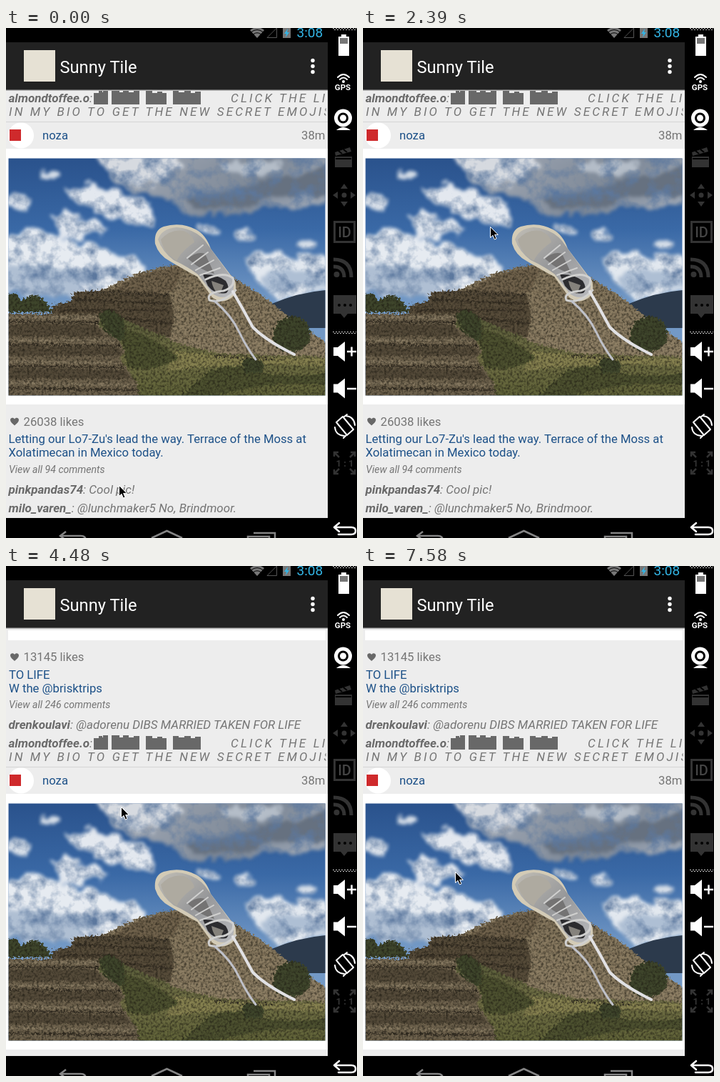
Recreate the animation shown at these times as an HTML page. Size 492 by 714 pixels, loop 8 s.

```html
<!DOCTYPE html>
<html lang="en">
<head>
<meta charset="utf-8">
<title>Photo feed</title>
<style>
html, body { margin: 0; width: 100%; height: 100%; overflow: hidden; background: #000; }
svg { display: block; }
text { font: 16.7px Roboto, sans-serif; fill: #757575; white-space: pre; }
.link { fill: #1d5188; }
.note { font-size: 14.1px; font-style: italic; fill: #757575; }
.say { font-size: 17px; font-style: italic; fill: #757575; }
.say tspan { font-weight: 700; fill: #6a6a6a; }
.wide { letter-spacing: 3.15px; }
.title { font-size: 23.7px; fill: #fff; }
.clock { font-size: 19px; fill: #33b5e5; }
.line { fill: none; stroke-linecap: round; stroke-linejoin: round; }
.on { fill: #fff; }
.off { fill: #333; }

#feed { animation: scroll 8s step-end infinite; }
#cursor { animation: point 8s step-end infinite; }

@keyframes scroll {
  0% { transform: translateY(-150px); }
  33.625%, 100% { transform: translateY(0); }
}
@keyframes point {
  0% { transform: translate(158px, 640px); }
  1.875% { transform: translate(157px, 641px); }
  5.5% { transform: translate(158px, 627px); }
  7.375% { transform: translate(158px, 613px); }
  14.875% { transform: translate(160px, 560px); }
  16.75% { transform: translate(168px, 430px); }
  18.625% { transform: translate(177px, 310px); }
  20.5% { transform: translate(178px, 273px); }
  28% { transform: translate(178px, 275px); }
  29.875% { transform: translate(178px, 278px); }
  33.625% { transform: translate(167px, 336px); }
  35.5% { transform: translate(167px, 338px); }
  37.375% { transform: translate(166px, 339px); }
  39.25% { transform: translate(165px, 339px); }
  44.875% { transform: translate(165px, 338px); }
  50.375% { transform: translate(164px, 337px); }
  54.125% { transform: translate(163px, 337px); }
  56% { transform: translate(161px, 337px); }
  57.875% { transform: translate(150px, 330px); }
  59.75% { transform: translate(130px, 318px); }
  61.5% { transform: translate(108px, 304px); }
  63.375% { transform: translate(94px, 292px); }
  65.25% { transform: translate(99px, 281px); }
  67% { transform: translate(109px, 272px); }
  74.375% { transform: translate(90px, 258px); }
  76.25% { transform: translate(60px, 238px); }
  78.125% { transform: translate(28px, 222px); }
  80% { transform: translate(10px, 214px); }
  81.75% { transform: translate(34px, 228px); }
  83.625% { transform: translate(50px, 255px); }
  85.5% { transform: translate(72px, 300px); }
  87.375% { transform: translate(95px, 350px); }
  89.25% { transform: translate(112px, 390px); }
  91.125% { transform: translate(124px, 414px); }
  92.875% { transform: translate(128px, 425px); }
  94.75%, 100% { transform: translate(129px, 428px); }
}
</style>
</head>
<body>
<svg width="492" height="714" viewBox="0 0 492 714">
<defs>
  <clipPath id="view"><rect y="87" width="451" height="599"/></clipPath>
  <clipPath id="column"><rect x="3" width="445.5" height="900"/></clipPath>
  <linearGradient id="sky" x2="0" y2="1">
    <stop offset="0" stop-color="#2a528c"/>
    <stop offset=".3" stop-color="#3a69a6"/>
    <stop offset=".6" stop-color="#7399c6"/>
  </linearGradient>
  <linearGradient id="storm" x2="1" y2=".25">
    <stop offset="0" stop-color="#bcc4cf"/>
    <stop offset=".35" stop-color="#949daa"/>
    <stop offset=".75" stop-color="#7b8695"/>
    <stop offset="1" stop-color="#98a2b0"/>
  </linearGradient>
  <linearGradient id="stone" x2="0" y2="1">
    <stop offset="0" stop-color="#82745b"/>
    <stop offset="1" stop-color="#94856a"/>
  </linearGradient>
  <linearGradient id="grass" x2="0" y2="1">
    <stop offset="0" stop-color="#565a38"/>
    <stop offset=".5" stop-color="#706f45"/>
    <stop offset="1" stop-color="#5d6036"/>
  </linearGradient>
  <linearGradient id="canvas" x2="1" y2="1">
    <stop offset="0" stop-color="#c0bdb5"/>
    <stop offset=".5" stop-color="#97989a"/>
    <stop offset="1" stop-color="#b9babd"/>
  </linearGradient>
  <filter id="ragged" x="-10%" y="-10%" width="120%" height="120%" color-interpolation-filters="sRGB">
    <feTurbulence type="fractalNoise" baseFrequency=".045" numOctaves="4" seed="4" result="noise"/>
    <feDisplacementMap in="SourceGraphic" in2="noise" scale="24" xChannelSelector="R" yChannelSelector="G"/>
    <feGaussianBlur stdDeviation="2.5" result="cloud"/>
    <feColorMatrix in="noise" values="0 0 0 0 .36  0 0 0 0 .47  0 0 0 0 .62  0 0 2.2 0 -.9"/>
    <feComposite in2="cloud" operator="in" result="shade"/>
    <feMerge><feMergeNode in="cloud"/><feMergeNode in="shade"/></feMerge>
  </filter>
  <filter id="grain" x="0" y="0" width="100%" height="100%" color-interpolation-filters="sRGB">
    <feTurbulence type="fractalNoise" baseFrequency=".3" numOctaves="3" seed="9" result="noise"/>
    <feDisplacementMap in="SourceGraphic" in2="noise" scale="9" xChannelSelector="R" yChannelSelector="G" result="rough"/>
    <feColorMatrix in="noise" values="0 0 0 0 .1  0 0 0 0 .09  0 0 0 0 .06  1.5 0 0 0 -.6"/>
    <feComposite in2="rough" operator="in" result="specks"/>
    <feMerge><feMergeNode in="rough"/><feMergeNode in="specks"/></feMerge>
  </filter>
  <path id="heart" d="M12 133C9 130.500 6 128 6 125.300C6 121.700 10.500 121.200 12 124C13.500 121.200 18 121.700 18 125.300C18 128 15 130.500 12 133Z" fill="#686868"/>
</defs>

<rect width="492" height="714"/>

<!-- Feed -->
<g clip-path="url(#view)">
  <rect y="86" width="451" height="600" fill="#ededed"/>
  <g id="feed">
    <rect x="3" y="90" width="445" height="14" fill="#fff"/>
    <use href="#heart"/>
    <text x="24.500" y="133">13145 likes</text>
    <text class="link" x="4" y="158">TO LIFE</text>
    <text class="link" x="4" y="177">W the @brisktrips</text>
    <text class="note" x="4" y="199">View all 246 comments</text>
    <text class="say" x="3.500" y="228"><tspan>drenkoulavi</tspan>: @adorenu DIBS MARRIED TAKEN FOR LIFE</text>
    <text class="say" x="3.500" y="254"><tspan>almondtoffee.o</tspan>:</text>
    <path fill="#686868" d="M123 257v-16h7v-3h5v2h1v-3h7v20zM148 257v-20h11v3h5v-3h8v3h7v-2h8v19zM196 257v-19h9v3h7v-2h7v2h6v16zM234 257v-19h8v2h8v-2h9v3h6v-2h8v18z"/>
    <g clip-path="url(#column)">
      <text class="say wide" x="315" y="254">CLICK THE LI</text>
      <text class="say wide" x="4" y="273">IN MY BIO TO GET THE NEW SECRET EMOJIS</text>
    </g>
    <path d="M0 281.500H451" stroke="#d5d5d5"/>

    <circle cx="21" cy="300.500" r="18" fill="#fff"/>
    <rect x="5" y="292" width="16" height="16" fill="#cf2a2c"/>
    <text class="link" x="51" y="305.500">noza</text>
    <text x="447.500" y="305.500" text-anchor="end">38m</text>
    <rect y="319" width="451" height="358" fill="#fff"/>

    <svg x="3.500" y="332.500" width="444" height="332" viewBox="3.500 182.500 444 332">
      <rect x="3" y="182" width="446" height="334" fill="url(#sky)"/>
      <g filter="url(#ragged)">
        <path fill="url(#storm)" d="M128 175H460V250Q430 240 405 258Q370 242 345 256Q315 268 285 262Q255 262 238 246Q215 228 180 226Q140 214 144 200Z"/>
        <path fill="#d6dae0" d="M130 180H235Q260 190 232 202Q218 222 190 220Q155 214 142 200Z"/>
        <path fill="#667180" d="M250 240Q290 222 330 225Q380 212 455 195V232Q410 238 370 236Q320 258 280 256Z"/>
        <path fill="#b4bdc8" d="M300 186H380Q400 200 360 206Q330 212 310 202Z"/>
        <path fill="#e3e8ef" d="M82 228Q112 216 140 228Q180 226 200 245Q218 262 208 276Q178 284 160 268Q135 262 118 250Q95 245 82 228Z"/>
        <path fill="#e0e6ee" d="M60 262Q90 254 108 268Q135 268 142 282Q132 294 108 288Q95 300 72 292Q80 275 60 262Z"/>
        <path fill="#e6ebf1" d="M-5 300Q35 272 62 288Q90 300 112 300Q150 310 165 324Q190 318 200 340L160 376H-5Z"/>
        <path fill="#afbfd3" d="M0 335Q42 322 78 342Q100 330 124 350L105 376H0Z"/>
        <path fill="#e2e8ef" d="M335 325Q360 302 388 318Q425 312 460 330V372Q410 370 385 382Q360 365 345 350Z"/>
        <path fill="#aebfd4" d="M352 345Q400 332 455 350V364Q395 364 370 370Z"/>
        <g fill="#d6dee8">
          <ellipse cx="60" cy="206" rx="13" ry="6"/><ellipse cx="422" cy="300" rx="17" ry="7"/>
          <ellipse cx="18" cy="244" rx="18" ry="7"/><ellipse cx="284" cy="281" rx="18" ry="8"/>
          <ellipse cx="332" cy="290" rx="15" ry="5"/>
        </g>
      </g>
      <path fill="#2c3a4c" d="M370 387Q410 370 448 367V420H380Z"/>
      <g filter="url(#grain)">
        <path fill="url(#stone)" d="M90 386L145 362L180 345L217 335L247 330L285 332L322 351L355 371L400 407L455 445V520H90Z"/>
        <path fill="#6f614b" d="M143 369L181 347L216 338L250 333L233 370Z"/>
        <path fill="none" stroke="#766850" d="M190 350L330 358M220 368L350 374M235 388L380 393M240 410L400 413M245 432L425 432"/>
        <path fill="url(#grass)" d="M130 405L180 402L235 440L300 456L455 460V520H130Z"/>
        <path fill="#85804f" d="M235 452Q330 463 455 462V474Q330 466 225 480Z"/>
        <path fill="#4c502f" d="M160 420Q210 432 242 462Q200 485 170 474ZM285 480Q330 465 358 484Q410 490 455 482V500Q360 492 280 520H240Z"/>
        <path fill="#564b39" d="M65 388L92 382L94 370L145 366L229 371L235 403L230 433L200 424L160 405H65Z"/>
        <path fill="none" stroke="#3b3327" stroke-width="2.500" d="M94 380L232 386M70 395H225M160 405L234 414"/>
        <path fill="#3e452b" d="M130 402Q140 388 157 400Q170 412 165 435Q150 446 140 426ZM375 424Q380 404 404 403Q430 410 426 437Q418 455 392 454Q370 446 375 424ZM-2 398V374Q15 366 21 382Q43 365 59 388L66 398ZM330 466Q346 456 360 469V483H335Z"/>
        <path fill="#6d614c" d="M-2 400H127L132 411H120L160 440L166 454L159 462L183 496L187 520H-2Z"/>
        <path fill="#544a39" d="M-2 414L126 415L138 432H-2ZM-2 445L157 447L162 459H-2ZM-2 475L165 478L176 491H-2Z"/>
        <path fill="none" stroke="#857860" stroke-width="3" d="M-2 405H128M-2 437L154 438M-2 467L161 469M-2 497L183 500"/>
        <path fill="none" stroke="#383126" stroke-width="2" d="M-2 411L130 412M-2 443L161 445M-2 473L166 475M-2 504L186 507"/>
        <path fill="none" stroke="#302b24" stroke-width="4" stroke-dasharray="1.500 3" d="M85 394L120 370L230 374M292 459L375 463"/>
      </g>
      <!-- Shoe -->
      <path fill="#d3cbb6" d="M209 302Q207 283 221 278Q245 271 266 282Q280 289 287 309L321 354Q325 369 317 377Q303 388 289 377L268 348Q247 337 229 326Q214 318 209 302Z"/>
      <path fill="url(#canvas)" d="M213 296Q218 281 239 279Q265 281 279 298L313 345Q324 360 316 372Q304 382 290 372L269 345Q253 333 235 325Q219 313 213 296Z"/>
      <path fill="#aeaaa0" d="M217 296Q231 281 249 284Q263 290 264 300Q246 312 239 326Q220 313 217 296Z"/>
      <path fill="#747373" d="M255 323Q267 312 279 316L292 344Q274 340 255 323Z"/>
      <path fill="#2c2c2f" d="M276 345Q295 344 308 354Q315 365 309 371Q293 374 283 361Z"/>
      <path fill="#85827c" d="M288 354L305 360L300 372Q291 370 288 354Z"/>
      <g class="line" stroke="#d0d0cf" stroke-width="2">
        <path d="M254 322L276 304M260 331L283 314M266 339L291 325M272 346L300 336"/>
        <path stroke-width="3" d="M280 352Q305 340 318 350Q322 362 305 368Q280 370 285 381Q303 387 322 367"/>
      </g>
      <g class="line" stroke="#e1e1e4" stroke-width="3">
        <path d="M292 382Q316 402 327 426Q337 447 350 464" stroke="#bfc1c9"/>
        <path d="M318 369Q332 393 346 419Q365 438 404 457" stroke-width="4"/>
      </g>
    </svg>

    <use href="#heart" y="573.500"/>
    <text x="24.500" y="706.500">26038 likes</text>
    <text class="link" x="3.500" y="731">Letting our Lo7-Zu's lead the way. Terrace of the Moss at</text>
    <text class="link" x="3.500" y="750">Xolatimecan in Mexico today.</text>
    <text class="note" x="4" y="773">View all 94 comments</text>
    <text class="say" x="3.500" y="802"><tspan>pinkpandas74</tspan>: Cool pic!</text>
    <text class="say" x="3.500" y="828"><tspan>milo_varen_</tspan>: @lunchmaker5 No, Brindmoor.</text>
  </g>
  <path d="M0 87.500H451" stroke="#b9b9b9"/>
</g>

<!-- Status and title bars -->
<path fill="#777" d="M342 3Q352 -5 362 3L352 14Z"/>
<path fill="none" stroke="#000" d="M344 5.500Q352 -.5 360 5.500M347 8.500Q352 5 357 8.500"/>
<path fill="none" stroke="#555" d="M366 13.500H379.500V0Z"/>
<path fill="#777" d="M388 0H399V14H388Z"/>
<path fill="#33b5e5" d="M395 1L390 8H393L392 13L397 6H394Z"/>
<text class="clock" x="407.500" y="13">3:08</text>
<rect y="20" width="451" height="66" fill="#222"/>
<path d="M0 86.500H451" stroke="#656565"/>
<rect x="25" y="31" width="44" height="44" fill="#e6e1d4"/>
<text class="title" x="75.500" y="62.500">Sunny Tile</text>
<g class="on"><circle cx="430" cy="45.500" r="2.700"/><circle cx="430" cy="53.500" r="2.700"/><circle cx="430" cy="61.500" r="2.700"/></g>

<!-- Navigation bar -->
<g fill="none" stroke="#858585" stroke-width="2.500">
  <path d="M84 705L76 711L84 717M76 711H105Q112 711 112 718"/>
  <path d="M204 714L225.500 704L247 714"/>
  <path d="M339 716V712H369V716M347 707H377V716"/>
</g>

<!-- Emulator tools -->
<path stroke="#c8c8c8" stroke-dasharray="2 2" d="M458 .5H491M460 2.500H491M458 425.500H491M460 427.500H491"/>
<path class="on" d="M470 9H477V12H481V39H466V12H470Z"/>
<path fill="#777" d="M468 14H479V22H468Z"/>
<circle class="on" cx="473" cy="75" r="2"/>
<path class="line" stroke="#fff" stroke-width="2" d="M468 72Q473 67 478 72M465 69Q473 61 481 69"/>
<text x="472" y="87" text-anchor="middle" style="font-weight:700;font-size:11.500px;fill:#fff">GPS</text>
<circle class="on" cx="472.500" cy="126" r="12.500"/>
<circle cx="472.500" cy="126" r="7.500"/><circle class="on" cx="472.500" cy="126" r="4.500"/>
<path class="on" d="M463 143Q472.500 135 483 143Z"/>

<path class="off" d="M461 180H485V195H461ZM461 174L482 167L484 173L462 179Z"/>
<path stroke="#000" stroke-width="2" d="M466 172L471 176M473 170L478 174M462 183H484"/>
<path class="off" d="M474 218L479 225H469ZM474 250L479 243H469ZM458 234L465 229V239ZM490 234L483 229V239Z"/>
<circle class="off" cx="474" cy="234" r="3.500"/>
<rect x="460.500" y="271.500" width="28" height="28" fill="none" stroke="#333" stroke-width="3"/>
<text x="474.500" y="293" text-anchor="middle" style="font-size:20px;font-weight:500;fill:#444">ID</text>
<circle class="off" cx="463.500" cy="345" r="4"/>
<path fill="none" stroke="#333" stroke-width="5" d="M459 334Q474 334 474 349M459 324Q484 324 484 349"/>
<path class="off" d="M459 374H491V400H479L474 406L469 400H459Z"/>
<g><circle cx="467" cy="388" r="2"/><circle cx="475" cy="388" r="2"/><circle cx="483" cy="388" r="2"/></g>

<path id="speaker" class="on" d="M459 447H465L475 439V467L465 459H459Z"/>
<use href="#speaker" y="51.500"/>
<path stroke="#fff" stroke-width="2.500" d="M478 453H491M484.500 446.500V459.500M478 505H491"/>
<g class="line" stroke="#fff" stroke-width="2">
  <path d="M463 552L472 544L487 562L478 570Z"/>
  <path d="M476 543Q488 544 489 556M474 571Q462 570 461 559"/>
  <path d="M473 545L478 541M477 570L473 574"/>
</g>
<path fill="none" stroke="#333" stroke-width="2.500" d="M460 600V594H466M460 594L467 601M489 600V594H483M489 594L482 601M460 618V624H466M460 624L467 617M489 618V624H483M489 624L482 617"/>
<text x="475" y="614" text-anchor="middle" style="font-size:13px;font-weight:700;fill:#333">1 : 1</text>
<path class="line" stroke="#fff" stroke-width="2.500" d="M467 693L460 699L467 705M461 699H484Q490 699 490 704Q490 709 484 709H466"/>

<path id="cursor" stroke="#fff" d="M.5 .5V15.500L4 12.300L6.400 18L9 16.900L6.600 11.400H11.300Z"/>
</svg>
</body>
</html>
```
